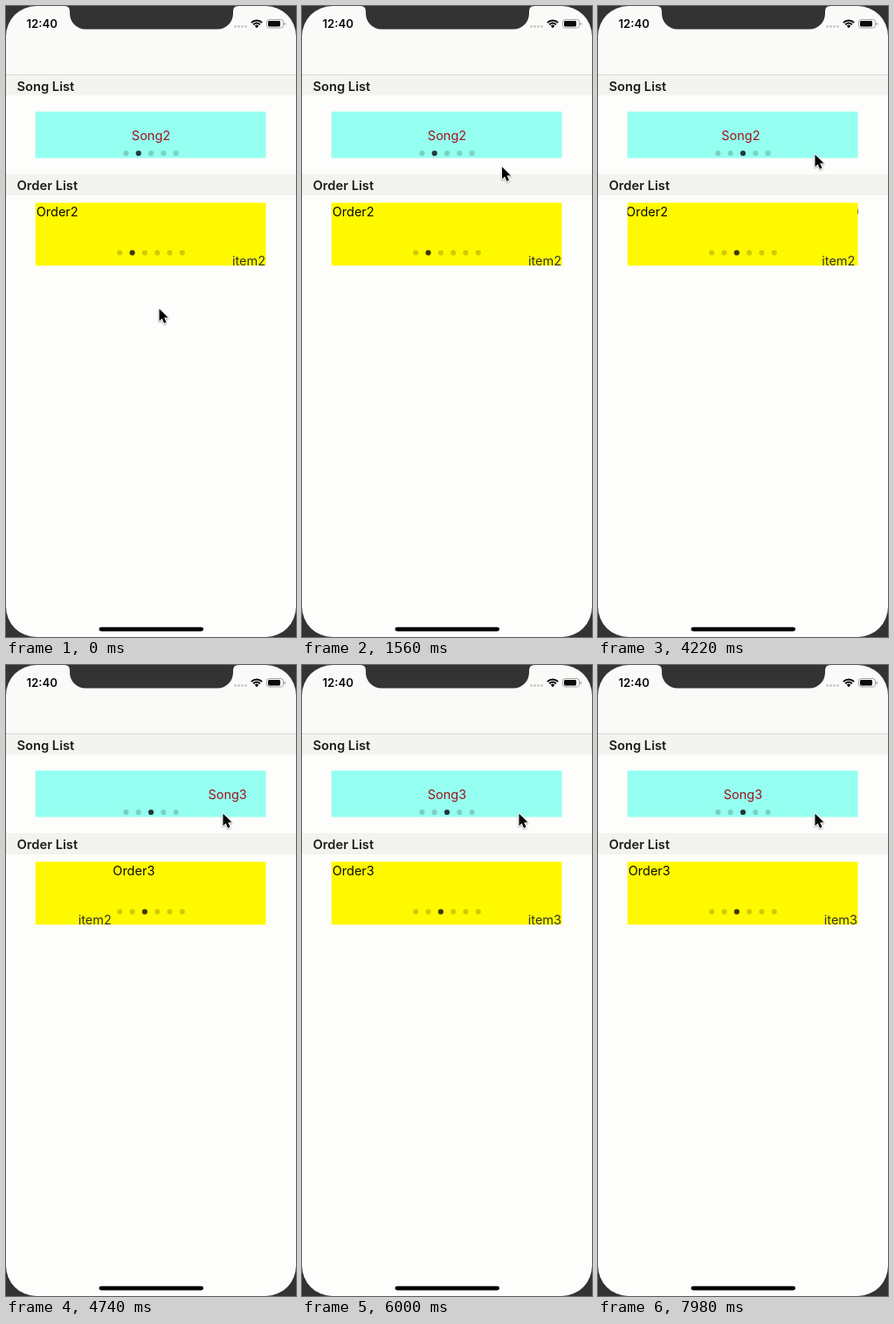
Animation of 332 by 720 pixels, one loop 8 s. Source, as an HTML page with a canvas:

```html
<!DOCTYPE html>
<html lang="en">
<head>
<meta charset="utf-8">
<title>Carousel lists</title>
<style>
html, body { margin: 0; width: 100%; height: 100%; overflow: hidden; background: #fdfdfc; }
canvas { display: block; width: 332px; height: 720px; }
</style>
</head>
<body>
<canvas id="stage"></canvas>
<script>
const W = 332, H = 720, LOOP = 8000;
const PAGE = 263.8, LEFT = 33.7;
const FONT = 'Inter, "Liberation Sans", sans-serif';
const INK = '#0a0a0a', PAPER = '#fdfdfc', BEZEL = '#333333';
const canvas = document.getElementById('stage');
const ctx = canvas.getContext('2d');
const dpr = window.devicePixelRatio || 1;
canvas.width = W * dpr;
canvas.height = H * dpr;

const smooth = u => {
  u = Math.min(1, Math.max(0, u));
  return u * u * (3 - 2 * u);
};

// Ticks come in groups of three, held for 20, 100 and 20 ms.
function tickAt(ms) {
  const rest = ms % 140;
  return 3 * Math.floor(ms / 140) + (rest < 20 ? 0 : rest < 120 ? 1 : 2);
}

function hermite(a, b, va, vb, span, u) {
  const u2 = u * u, u3 = u2 * u;
  return (2 * u3 - 3 * u2 + 1) * a + (u3 - 2 * u2 + u) * va * span
    + (3 * u2 - 2 * u3) * b + (u3 - u2) * vb * span;
}

function pointerAt(n) {
  const start = [175, 345], mid = [228.5, 183], end = [248, 169];
  const speed = [0.9, -0.9];
  const axis = i => n < 34
    ? hermite(start[i], mid[i], 0, speed[i], 34, n / 34)
    : hermite(mid[i], end[i], speed[i], 0, 24, Math.min(1, (n - 34) / 24));
  return [axis(0), axis(1)];
}

function rect(x, y, w, h, color) {
  ctx.fillStyle = color;
  ctx.fillRect(x, y, w, h);
}

function pill(x, y, w, h, r, color) {
  ctx.fillStyle = color;
  ctx.beginPath();
  ctx.roundRect(x, y, w, h, r);
  ctx.fill();
}

function disc(x, y, r, color) {
  ctx.fillStyle = color;
  ctx.beginPath();
  ctx.arc(x, y, r, 0, 7);
  ctx.fill();
}

function label(text, x, y, { size = 14.5, weight = 400, color = INK, align = 'left' } = {}) {
  ctx.font = `${weight} ${size}px ${FONT}`;
  ctx.textAlign = align;
  ctx.fillStyle = color;
  ctx.fillText(text, x, y);
}

function dots(count, active, y) {
  for (let i = 0; i < count; i++) {
    const x = 166 + (i - (count - 1) / 2) * 14.3;
    disc(x, y, 3.1, i === active ? 'rgba(0, 0, 0, 0.77)' : 'rgba(0, 0, 0, 0.18)');
  }
}

function carousel(y, h, color, shift, drawPage) {
  ctx.save();
  ctx.beginPath();
  ctx.rect(LEFT, y, PAGE, h);
  ctx.clip();
  rect(0, y - 1, W, h + 2, color);
  drawPage(2, LEFT - shift);
  drawPage(3, LEFT - shift + PAGE);
  ctx.restore();
}

function songPage(i, x) {
  label('Song' + i, x + PAGE / 2 + 0.4, 152.5, { color: '#a01418', align: 'center' });
}

function orderPage(i, x) {
  label('Order' + i, x + 1, 239.5);
  label('item' + i, x + PAGE - 0.5, 295.5, { color: '#333333', align: 'right' });
}

function header(text, y, h, baseline) {
  rect(0, y, W, h, '#f3f3f0');
  label(text, 12.5, baseline, { size: 14.7, weight: 600, color: '#1c1c1c' });
}

function statusBar() {
  label('12:40', 23.5, 25, { size: 13.2, weight: 600 });
  for (let i = 0; i < 4; i++) disc(262.6 + i * 4, 23.4, 1.4, '#c8c8c6');

  ctx.strokeStyle = INK;
  ctx.lineWidth = 2;
  for (const r of [5.4, 8.6]) {
    ctx.beginPath();
    ctx.arc(287, 25, r, -Math.PI * 0.75, -Math.PI * 0.25);
    ctx.stroke();
  }
  ctx.fillStyle = INK;
  ctx.beginPath();
  ctx.moveTo(287, 25.3);
  ctx.arc(287, 25, 3.2, -Math.PI * 0.75, -Math.PI * 0.25);
  ctx.fill();

  ctx.strokeStyle = '#a3a3a1';
  ctx.lineWidth = 1;
  ctx.beginPath();
  ctx.roundRect(298.5, 15.5, 19, 9.5, 2.8);
  ctx.stroke();
  pill(300, 17, 14, 6.5, 1.4, INK);
  pill(318.6, 18.7, 1.3, 3.2, 0.8, '#a3a3a1');
}

function bezel() {
  ctx.fillStyle = BEZEL;
  ctx.beginPath();
  ctx.rect(0, 0, W, H);
  ctx.roundRect(0, 0, W, H, 34.5);
  ctx.fill('evenodd');

  ctx.beginPath();
  ctx.moveTo(67, 0);
  ctx.quadraticCurveTo(73, 0, 73, 6);
  ctx.arcTo(73, 26.5, 91, 26.5, 18);
  ctx.arcTo(260, 26.5, 260, 8, 18);
  ctx.lineTo(260, 6);
  ctx.quadraticCurveTo(260, 0, 266, 0);
  ctx.fill();
}

function pointer(x, y) {
  ctx.save();
  ctx.translate(x, y);
  ctx.scale(0.96, 0.96);
  ctx.beginPath();
  ctx.moveTo(0.5, 0.5);
  for (const [px, py] of [[0.5, 15], [3.8, 12], [6.3, 17.6], [8.8, 16.5], [6.4, 11], [11, 11]]) {
    ctx.lineTo(px, py);
  }
  ctx.closePath();
  ctx.lineJoin = 'round';
  ctx.lineWidth = 2;
  ctx.strokeStyle = '#fff';
  ctx.shadowColor = 'rgba(0, 0, 0, 0.35)';
  ctx.shadowBlur = 2 * dpr;
  ctx.shadowOffsetY = dpr;
  ctx.stroke();
  ctx.shadowColor = 'transparent';
  ctx.fillStyle = '#000';
  ctx.fill();
  ctx.restore();
}

function draw(ms) {
  const n = tickAt(ms);
  const shift = PAGE * smooth((n - 89.95) / 18);
  const active = shift > 0 ? 2 : 1;

  ctx.setTransform(dpr, 0, 0, dpr, 0, 0);
  rect(0, 0, W, H, PAPER);
  rect(0, 0, W, 78, '#fafaf8');
  header('Song List', 78, 24, 96.5);
  rect(0, 78, W, 1, '#d8d8d6');
  header('Order List', 192, 24, 209.7);

  carousel(120.4, 53.1, '#94fff0', shift, songPage);
  carousel(224.4, 71.8, '#fff900', shift, orderPage);
  dots(5, active, 168);
  dots(6, active, 281.5);

  statusBar();
  pill(106.5, 708.7, 119.5, 4.8, 2.4, '#000');
  bezel();
  pointer(...pointerAt(n));
}

function loop() {
  draw(performance.now() % LOOP);
  requestAnimationFrame(loop);
}
loop();
</script>
</body>
</html>
```
